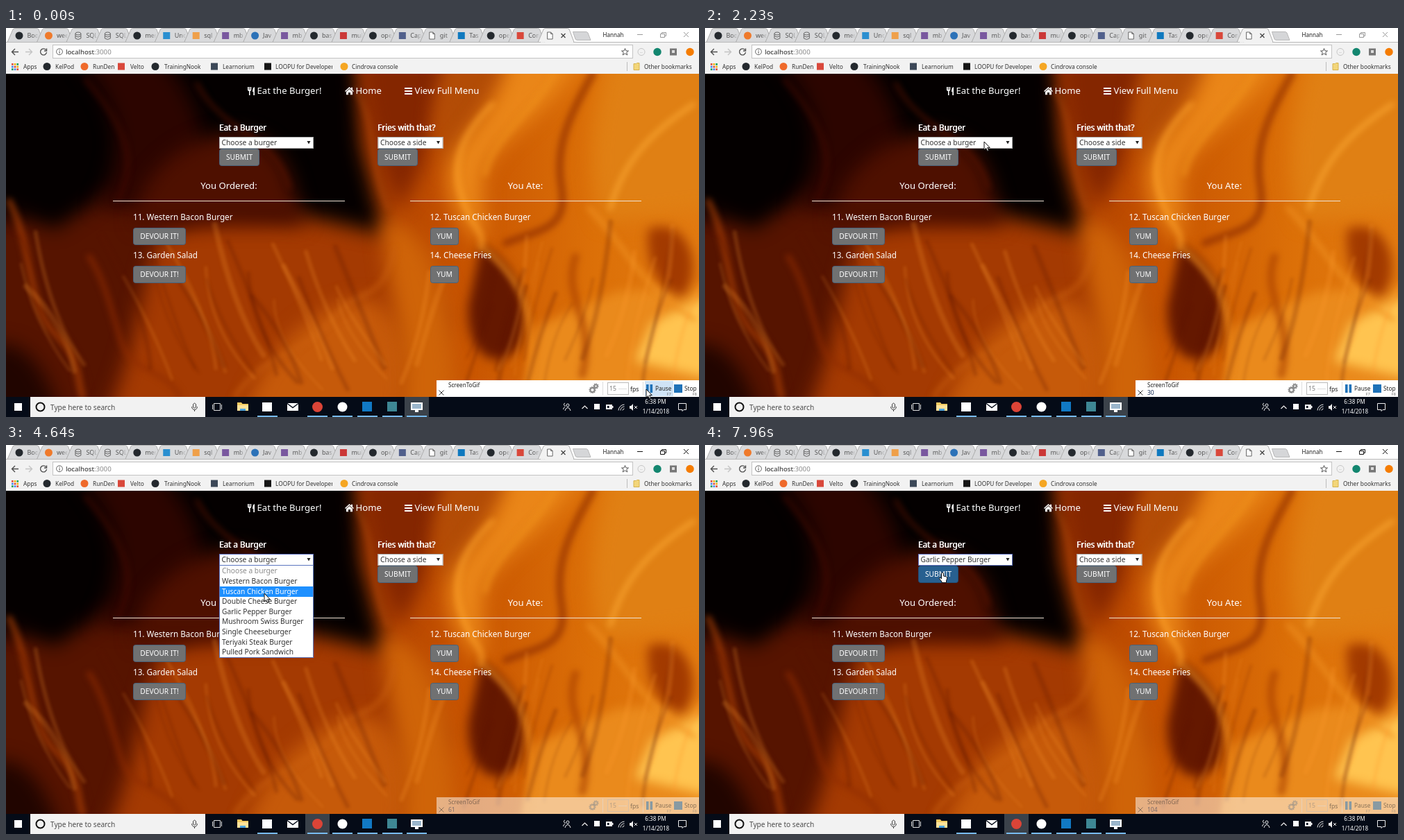
Write an HTML page with a canvas that moves like this. It is 998x561 px and loops after 8000 ms.

```html
<!DOCTYPE html>
<html lang="en">
<head>
<meta charset="utf-8">
<title>Burger order page</title>
<style>
html, body { margin: 0; width: 100%; height: 100%; overflow: hidden; background: #000; }
canvas { display: block; width: 998px; height: 561px; }
</style>
</head>
<body>
<canvas id="stage" width="998" height="561"></canvas>
<script>
const W = 998, H = 561, LOOP = 8000;
const FOCUS = 2530, OPEN = 2610, CHOSEN = 6100;
const ctx = document.getElementById('stage').getContext('2d');

// Screen refreshes: start, end, first count, number of steps
const BURSTS = [
  [80, 820, 2, 11], [900, 1680, 13, 11], [1760, 2530, 24, 11], [2610, 3390, 35, 11],
  [3470, 4020, 46, 8], [4220, 4950, 55, 11], [5030, 5790, 66, 11], [5870, 6640, 77, 11],
  [6720, 7510, 88, 11], [7570, 7960, 99, 6]
];
// Pointer: time, x, y
const PATH = [
  [0, 922, 521], [450, 922, 521], [820, 699, 361], [900, 600, 332], [1260, 345, 190],
  [1700, 345, 190], [2150, 402, 164], [2300, 402, 164], [2530, 434, 165], [3240, 434, 165],
  [3390, 428, 176], [3620, 405, 191], [4020, 378, 197], [4220, 376, 199], [4640, 372, 213],
  [4950, 371, 235], [5300, 371, 240], [5870, 370, 244], [6150, 370, 244], [6560, 342, 184]
];
const BURGERS = ['Choose a burger', 'Western Bacon Burger', 'Tuscan Chicken Burger',
  'Double Cheese Burger', 'Garlic Pepper Burger', 'Mushroom Swiss Burger',
  'Single Cheeseburger', 'Teriyaki Steak Burger', 'Pulled Pork Sandwich'];
const TABS = [
  ['Boo', 'dot', '#24292e'], ['wee', 'dot', '#ef7a2b'], ['SQL', 'db'], ['SQL', 'db'],
  ['men', 'dot', '#24292e'], ['Und', 'box', '#2a8fd0'], ['sql', 'box', '#efa04a'],
  ['mb', 'box', '#79589f'], ['Jav', 'dot', '#2c72b8'], ['mb', 'box', '#79589f'],
  ['bas', 'dot', '#24292e'], ['mul', 'box', '#cb3837'], ['ope', 'dot', '#24292e'],
  ['Cap', 'box', '#51608c'], ['git', 'page'], ['Tas', 'box', '#0f79bf'],
  ['ope', 'dot', '#24292e'], ['Con', 'box', '#d9483b'], ['', 'page']
];
const BOOKMARKS = [
  [59, 71, 'KelPod', 'dot', '#24292e'], [113, 125, 'RunDen', 'dot', '#ef6a2b'],
  [166, 179, 'Velto', 'box', '#d9483b'], [215, 228, 'TrainingNook', 'dot', '#24292e'],
  [300, 312, 'Learnorium', 'box', '#3c4858'], [377, 388, 'LOOPU for Developers', 'box', '#151515'],
  [487, 498, 'Cindrova console', 'dot', '#f5a623']
];

function text(s, x, y, size, color, align = 'left') {
  ctx.font = `${size}px "Noto Sans", "Open Sans", sans-serif`;
  ctx.textAlign = align;
  ctx.fillStyle = color;
  ctx.fillText(s, x, y);
}
function rect(x, y, w, h, color) {
  ctx.fillStyle = color;
  ctx.fillRect(x, y, w, h);
}
function frame(x, y, w, h, color) {
  ctx.strokeStyle = color;
  ctx.lineWidth = 1;
  ctx.strokeRect(x + .5, y + .5, w - 1, h - 1);
}
function dot(x, y, r, color) {
  ctx.fillStyle = color;
  ctx.beginPath();
  ctx.arc(x, y, r, 0, Math.PI * 2);
  ctx.fill();
}
function ring(x, y, r, color, width = 1) {
  ctx.strokeStyle = color;
  ctx.lineWidth = width;
  ctx.beginPath();
  ctx.arc(x, y, r, 0, Math.PI * 2);
  ctx.stroke();
}
function line(d, color, width = 1) {
  ctx.strokeStyle = color;
  ctx.lineWidth = width;
  ctx.stroke(new Path2D(d));
}
function shape(d, fill, stroke) {
  const p = new Path2D(d);
  ctx.fillStyle = fill;
  ctx.fill(p);
  if (stroke) { ctx.strokeStyle = stroke; ctx.lineWidth = 1; ctx.stroke(p); }
}
function at(x, y, draw) {
  ctx.save();
  ctx.translate(x, y);
  draw();
  ctx.restore();
}
function icon(kind, x, y, color, r = 5.5) {
  if (kind === 'dot') dot(x, y, r, color);
  else if (kind === 'box') rect(x - r + .5, y - r + .5, 2 * r - 1, 2 * r - 1, color);
  else at(x, y, () => {
    if (kind === 'page') return shape('M-3.5-5H1.5L4-2.5V5H-3.5ZM1.5-5V-2.5H4', '#fff', '#666');
    ctx.beginPath();
    ctx.ellipse(0, -3, 4, 2, 0, 0, 7);
    ctx.strokeStyle = '#666';
    ctx.lineWidth = 1;
    ctx.stroke();
    line('M-4-3V4Q0 7 4 4V-3M-4 .5Q0 3.5 4 .5', '#666');
  });
}

// Backdrop: soft masses of flame, then tongues, then thin wisps
function paintFire() {
  const c = document.createElement('canvas');
  c.width = W; c.height = H;
  const g = c.getContext('2d');
  const base = g.createLinearGradient(0, 0, W, 0);
  [[0, '#240600'], [.15, '#4a0f00'], [.3, '#842800'], [.5, '#a83c00'], [.65, '#c65200'], [.85, '#dc7008'], [1, '#e27a10']]
    .forEach(([p, col]) => base.addColorStop(p, col));
  g.fillStyle = base;
  g.fillRect(0, 0, W, H);
  const masses = [
    ['#561400', 'M-40 290L150 240L270 265L230 400L130 590H-40Z'],
    ['#a43a02', 'M220 300C340 262 450 285 560 300L640 420L560 590H130C190 470 190 380 220 300Z'],
    ['#c65a0a', 'M330 590C370 460 440 400 520 390C580 410 590 500 560 590Z'],
    ['#040000', 'M-40 20H505L512 170L545 298L430 270L330 256L150 235L70 290L-40 240Z'],
    ['#2c0500', 'M100 40C160 110 180 170 130 260L300 262C280 190 300 120 220 40Z'],
    ['#4e1000', 'M185 285C190 215 240 175 300 155C350 140 400 170 412 225L430 285Z'],
    ['#210500', 'M-30 460C20 440 60 480 85 590H-30Z'],
    ['#842600', 'M510 40H650C600 140 625 180 565 260C535 200 515 130 510 40Z'],
    ['#b24c06', 'M640 40H740C710 110 660 160 640 210C610 150 615 100 640 40Z'],
    ['#ea8618', 'M725 40H830C790 120 720 150 692 200C680 250 694 280 686 312C640 270 625 220 645 180C680 130 710 110 725 40Z'],
    ['#e08014', 'M870 40H1030V260L860 280C830 200 850 110 870 40Z'],
    ['#cf6408', 'M545 275C600 280 660 370 645 590H565C590 450 540 380 545 275Z']
  ];
  const details = [
    ['#641800', 'M684 314C740 345 760 410 738 460C705 500 662 470 666 400Z'],
    ['#ea8a1c', 'M765 430L880 380L1030 370V590H735Z'],
    ['#a23a00', 'M925 290C985 270 1005 350 975 388C940 380 920 340 925 290Z'],
    ['#ffc450', 'M1030 375L930 425L905 480L1030 510Z']
  ];
  const fill = ([col, d]) => { g.fillStyle = col; g.fill(new Path2D(d)); };
  g.filter = 'blur(14px)';
  masses.forEach(fill);
  g.filter = 'blur(8px)';
  details.forEach(fill);
  const tongues = [
    ['#ffa62c', 8, 'M700 110C660 150 640 190 655 240S690 290 684 318'],
    ['#ef8f1c', 8, 'M790 66C760 120 700 160 690 210'],
    ['#8a2a00', 11, 'M845 66C810 130 790 170 800 230S770 290 720 310'],
    ['#ffae38', 7, 'M990 110C930 150 890 190 870 260'],
    ['#f89a22', 7, 'M690 320C750 370 770 430 748 531'],
    ['#f09222', 8, 'M840 260C890 310 910 370 990 420'],
    ['#a84000', 11, 'M820 330C800 390 850 420 830 500'],
    ['#b84606', 9, 'M5 250C40 320 30 400 70 440S100 500 110 531'],
    ['#8f2c00', 8, 'M120 330C140 360 150 400 165 450S230 490 250 531'],
    ['#cc6210', 6, 'M330 531C370 470 430 470 470 420S540 400 560 320'],
    ['#6a1703', 5, 'M275 80C310 150 390 155 408 230'],
    ['#4a0d00', 6, 'M115 75C175 145 190 195 160 250'],
    ['#b44c0a', 5, 'M505 90C535 145 520 190 550 260']
  ];
  g.filter = 'blur(4px)';
  g.lineCap = 'round';
  g.globalAlpha = .6;
  tongues.forEach(([col, w, d]) => {
    g.strokeStyle = col;
    g.lineWidth = w;
    g.stroke(new Path2D(d));
  });
  let seed = 7;
  const rand = () => (seed = seed * 16807 % 2147483647) / 2147483647;
  g.filter = 'blur(2px)';
  g.globalAlpha = .22;
  for (let i = 0; i < 46; i++) {
    const x = 90 + rand() * 900, y = 531 - rand() * 60, lean = x < 560 ? -70 : 40;
    g.strokeStyle = i % 2 ? '#ff9a30' : '#5a1400';
    g.lineWidth = 2 + rand() * 6;
    g.beginPath();
    g.moveTo(x, y);
    g.quadraticCurveTo(x + lean * rand(), y - 70, x + lean, y - 110 - rand() * 90);
    g.stroke();
  }
  return c;
}
const fire = paintFire();

function browser(active) {
  rect(0, 0, W, 66, '#f2f2f2');
  rect(0, 0, W, 20, '#fff');
  TABS.forEach(([label, kind, color], i) => {
    const x = 19 + i * 42.45, current = i === TABS.length - 1;
    at(x, 0, () => shape('M-17 20.5L-9 2Q-8 .5-6 .5H25Q27 .5 28 2L35 20.5', current ? '#f2f2f2' : '#d8d9db', '#adadad'));
    icon(kind, x, 11, color);
    const fade = ctx.createLinearGradient(x + 12, 0, x + 28, 0);
    fade.addColorStop(.45, '#555');
    fade.addColorStop(1, 'rgba(85,85,85,0)');
    text(label, x + 11.5, 14.3, 9, fade);
  });
  line('M799.5 8L805.5 14M805.5 8L799.5 14', '#444', 1.3);
  shape('M816.5 5.5H835Q837 5.5 838 7L842 17.5H823Q821 17.5 820 16Z', '#d5d6d8', '#b8b8b8');
  text('Hannah', 874.5, 13, 8.1, '#222', 'center');
  const ink = active ? '#111' : '#999';
  line('M909 9.5H917', ink);
  line('M942.5 8.5H948.5V13.5H942.5ZM944.5 8V6.5H950.5V11.5H949', ink);
  line('M976 6L983 13M983 6L976 13', ink);
  rect(0, 20, 770, 1, '#b9b9b9');
  rect(817, 20, 181, 1, '#b9b9b9');

  line('M18 34.5H8.5M13 30L8.5 34.5L13 39', '#505050', 1.4);
  line('M28 34.5H37.5M33 30L37.5 34.5L33 39', '#c4c4c4', 1.4);
  line('M57.5 31.5A4.5 4.5 0 1 0 58.5 35M58.5 29.5V33H55', '#505050', 1.4);
  rect(67, 24, 836, 20, '#fff');
  frame(67, 24, 836, 20, '#c3c3c3');
  ring(77, 34.2, 4.4, '#666');
  rect(76.5, 33.5, 1.1, 3.3, '#666');
  rect(76.5, 31.4, 1.1, 1.2, '#666');
  text('localhost', 86, 37.8, 9.7, '#222');
  text(':3000', 86 + ctx.measureText('localhost').width, 37.8, 9.7, '#888');
  line('M891.5 29.5L893 33H896.5L893.7 35.3L894.8 39L891.5 36.8L888.2 39L889.3 35.3L886.5 33H890Z', '#555');
  ring(915, 34.5, 5, '#c6c6c6');
  text('..', 915, 36, 7, '#aaa', 'center');
  dot(938, 34.5, 5.7, '#13866f');
  rect(956, 29.5, 10, 10, '#777');
  rect(959, 32, 4, 4, '#ddd');
  dot(985, 34.5, 5.7, '#f57c00');

  const grid = ['#dd4b39', '#f4b400', '#0f9d58', '#4285f4'];
  for (let i = 0; i < 9; i++) rect(8 + i % 3 * 3.7, 51 + (i / 3 | 0) * 3.7, 2.6, 2.6, grid[i % 4]);
  text('Apps', 25, 58.7, 8.3, '#333');
  BOOKMARKS.forEach(([x, tx, label, kind, color]) => {
    icon(kind, x, 55.5, color);
    ctx.save();
    ctx.beginPath();
    ctx.rect(tx, 46, 82, 20);
    ctx.clip();
    text(label, tx, 58.7, 8.3, '#333');
    ctx.restore();
  });
  rect(894, 49, 1, 13, '#bbb');
  shape('M904 51.5H907.5L908.5 50.5H912V60.5H904Z', '#f3d67a', '#d5b34f');
  text('Other bookmarks', 919, 58.7, 8.3, '#333');
}

function button(label, x, y, w, hot) {
  ctx.beginPath();
  ctx.roundRect(x + .5, y + .5, w - 1, 24, 3);
  ctx.fillStyle = hot ? '#286090' : '#707172';
  ctx.fill();
  ctx.strokeStyle = hot ? '#204d74' : '#48617a';
  ctx.lineWidth = 1;
  ctx.stroke();
  text(label, x + w / 2, y + 16.2, 10.23, '#fff', 'center');
}
function select(label, x, w, focus) {
  rect(x, 157, w, 17, '#fff');
  frame(x, 157, w, 17, focus ? '#6174c4' : '#a9a9a9');
  text(label, x + 3.5, 169.3, 10.23, '#333');
  at(x + w - 7, 165, () => shape('M-2.5-2H2.5L0 2.5Z', '#222'));
}
function boldLabel(s, x, y) {
  text(s, x, y, 11.69, '#fff');
  text(s, x + .6, y, 11.69, '#fff');
}

function page(t, p) {
  ctx.drawImage(fire, 0, 66, W, 466, 0, 66, W, 466);
  shape('M348 85V89Q348 91 350 91V97H351.5V91Q353.2 91 353.2 89V85H352V89H351.3V85H350.2V89H349.5V85ZM358 85Q355 86 355 92H356.3V97H358Z', '#fff');
  text('Eat the Burger!', 361.5, 95.3, 13.15, '#fff');
  shape('M488 91L494.5 85L497 87.3V85.7H499V89.2L501 91L500 92L494.5 87L489 92ZM490 92L494.5 88L499 92V96.3H496V93H493V96.3H490Z', '#fff');
  text('Home', 503.5, 95.3, 13.15, '#fff');
  for (const y of [86, 90, 94]) rect(574, y, 11, 2, '#fff');
  text('View Full Menu', 588.5, 95.3, 13.15, '#fff');

  boldLabel('Eat a Burger', 306.8, 147.6);
  boldLabel('Fries with that?', 535, 147.6);
  const open = t >= OPEN && t < CHOSEN;
  select(t >= CHOSEN ? BURGERS[4] : BURGERS[0], 307, 136, t >= FOCUS);
  select('Choose a side', 535.5, 94, false);
  button('SUBMIT', 307, 174, 58, !open && overSubmit(p));
  button('SUBMIT', 535, 174, 58, false);

  text('You Ordered:', 321, 232, 13.15, '#fff', 'center');
  text('You Ate:', 748, 232, 13.15, '#fff', 'center');
  rect(154, 249, 334, 1, '#eee3d5');
  rect(582, 249, 333, 1, '#eee3d5');
  text('11. Western Bacon Burger', 183, 276.6, 11.69, '#fff');
  text('13. Garden Salad', 183, 332.2, 11.69, '#fff');
  text('12. Tuscan Chicken Burger', 610.5, 276.6, 11.69, '#fff');
  text('14. Cheese Fries', 610.5, 332.2, 11.69, '#fff');
  button('DEVOUR IT!', 183, 288, 76, false);
  button('DEVOUR IT!', 183, 343, 76, false);
  button('YUM', 611, 288, 41, false);
  button('YUM', 611, 343, 41, t >= 860 && t < 970);
  if (open) menu(p);
}

function menu(p) {
  const top = 174.3, step = 14.6;
  const row = Math.max(0, Math.floor((p.y - top) / step));
  rect(307, 174, 136, 133, '#fff');
  BURGERS.forEach((name, i) => {
    const y = Math.round(top + i * step), lit = i === row;
    if (lit) rect(308, y, 134, 15, i ? '#1e90ff' : '#c8c8c8');
    text(name, 311, y + 11.3, 10.23, !i ? '#8b8b8b' : lit ? '#fff' : '#333');
  });
  frame(307, 173, 136, 134, '#5b76c0');
}

function recorder(count, solid, hover) {
  ctx.save();
  ctx.globalAlpha = solid ? 1 : .5;
  rect(620, 508, 378, 24, '#fff');
  if (hover) rect(920, 509, 41, 22, '#cfe3f6');
  text('ScreenToGif', 637, 517.8, 8.1, '#222');
  line('M623.5 522.5L630.5 529.5M630.5 522.5L623.5 529.5', '#333');
  text(count, 637, 529.3, 8.5, '#152b55');
  for (const [x, y, r] of [[844.5, 522, 3.3], [849.5, 516.5, 2.4]]) {
    ctx.setLineDash([1.5, 1.1]);
    ring(x, y, r + 1, '#888', 1.5);
    ctx.setLineDash([]);
    ring(x, y, r - .3, '#888', 1.8);
  }
  rect(859, 510, 1, 20, '#ddd');
  frame(866, 511, 31, 18, '#bbb');
  text('15', 869, 523.3, 8.7, '#777');
  line('M882 520.5H894', '#ddd');
  text('fps', 899, 523.5, 8.7, '#222');
  rect(917, 510, 1, 20, '#ddd');
  rect(922, 514, 3.6, 12, '#1f72b8');
  rect(927.5, 514, 3.6, 12, '#1f72b8');
  text('Pause', 935, 522.7, 8.3, '#222');
  text('F7', 958, 529.5, 6, '#777', 'right');
  rect(962, 514, 12, 12, '#1f72b8');
  text('Stop', 977, 522.7, 8.3, '#222');
  text('F8', 995, 529.5, 6, '#777', 'right');
  ctx.restore();
}

function taskbar(active) {
  rect(0, 532, W, 29, '#050b17');
  rect(12, 541, 11, 11, '#fff');
  rect(35, 532, 252, 29, '#f2f2f2');
  ring(49.5, 546.5, 6, '#111', 2);
  text('Type here to search', 64, 550.7, 10.15, '#4c4c4c');
  line('M269.5 542.5Q271.5 539.5 273.5 542.5V547Q271.5 549.5 269.5 547ZM267.5 546Q268 550.5 271.5 550.5T275.5 546M271.5 550.5V553', '#444');

  rect(active ? 431 : 574, 532, 35, 29, '#3b424a');
  line('M299.5 541.5H308.5V551.5H299.5ZM297.5 543V550M310.5 543V550', '#ddd');
  shape('M333 540H339L340.5 542H349V552H333Z', '#f2cb62');
  rect(333, 544, 16, 8, '#ffe39a');
  rect(337, 549, 8, 3, '#4aa3df');
  rect(369, 540, 14, 13, '#fff');
  shape('M405 541H421V552H405Z', '#fff');
  line('M405 541.5L413 547.5L421 541.5', '#050b17', 1.4);
  dot(448.5, 546.5, 7.5, '#db4437');
  dot(484.5, 546.5, 7, '#fff');
  rect(513, 539, 14, 14, '#1179c4');
  rect(549, 539, 14, 14, '#3e8794');
  rect(583, 540, 17, 11, '#fff');
  rect(585, 542, 13, 7, '#9bb6cc');
  rect(589, 551, 5, 3, '#fff');
  for (const x of [376, 448, 484, 520, 556, 591]) rect(x - 14, 559, 29, 2, '#76b9ed');

  ring(809, 544, 2, '#eee');
  line('M805 552Q806 547.5 809 547.5T813 552M805 541A1.8 1.8 0 1 0 806 545M802.5 550Q803 547 805 546.5', '#eee');
  line('M829.5 549L833.5 545L837.5 549', '#eee', 1.2);
  rect(847, 542, 8, 8, '#fff');
  rect(864, 543, 9, 7, '#eee');
  rect(873, 545, 1.5, 3, '#eee');
  rect(866, 545, 2.5, 3, '#050b17');
  line('M882 551.5A9 9 0 0 1 890.5 543M885 551.5A6 6 0 0 1 890.5 546M888 551.5A3 3 0 0 1 890.5 549', '#eee');
  shape('M898 545H900L903 542V552L900 549H898Z', '#eee');
  line('M905 545L909 549M909 545L905 549', '#eee');
  text('6:38 PM', 935.5, 542.3, 8.1, '#fff', 'center');
  text('1/14/2018', 936, 555.5, 8.1, '#fff', 'center');
  line('M968.5 541.5H979.5V550.5H976L974 552.5V550.5H968.5Z', '#eee');
}

function overSubmit({ x, y }) {
  return x > 307 && x < 365 && y > 174 && y < 199;
}
function pointer(p, hand) {
  at(p.x, p.y, () => {
    if (hand) shape('M-1.5 1Q0-1.5 1.5 1V5L5.5 6Q7 6.3 6.8 8L5.5 12V14.5H-1V13L-4.5 8.8Q-4.8 7-2.8 7.5L-1.5 9Z', '#fff', '#111');
    else shape('M0 0V12L2.7 9.4L4.6 13.4L6.5 12.5L4.7 8.6H8.3Z', '#fff', '#111');
  });
}

function refresh(t) {
  const burst = BURSTS.filter(b => b[0] <= t).pop();
  if (!burst) return { time: 0, count: '' };
  const [start, end, first, steps] = burst;
  const gap = (end - start) / (steps - 1);
  const k = Math.min(steps - 1, Math.floor((t - start) / gap + .3));
  return { time: start + k * gap, count: String(first + k) };
}

// Smooth motion through the path, at rest where the pointer stops or turns
function pathSlope(i, axis) {
  if (i === 0 || i === PATH.length - 1) return 0;
  const rate = j => (PATH[j + 1][axis] - PATH[j][axis]) / (PATH[j + 1][0] - PATH[j][0]);
  const a = rate(i - 1), b = rate(i);
  return a * b > 0 ? 2 * a * b / (a + b) : 0;
}
function along(t, axis) {
  const i = PATH.findIndex(k => k[0] > t);
  if (i < 0) return PATH[PATH.length - 1][axis];
  const a = PATH[i - 1], b = PATH[i], span = b[0] - a[0], u = (t - a[0]) / span;
  const ease = u * u * (3 - 2 * u);
  return Math.round(a[axis] + (b[axis] - a[axis]) * ease
    + span * u * (1 - u) * ((1 - u) * pathSlope(i - 1, axis) - u * pathSlope(i, axis)));
}

function draw(now) {
  const { time, count } = refresh(now % LOOP);
  const p = { x: along(time, 1), y: along(time, 2) };
  const active = time >= OPEN;
  browser(active);
  page(time, p);
  recorder(count, !active, p.y > 508 && p.x > 919);
  taskbar(active);
  pointer(p, overSubmit(p) && (!active || time >= CHOSEN));
}

const begin = performance.now();
function tick() {
  draw(performance.now() - begin);
  requestAnimationFrame(tick);
}
tick();
</script>
</body>
</html>
```
